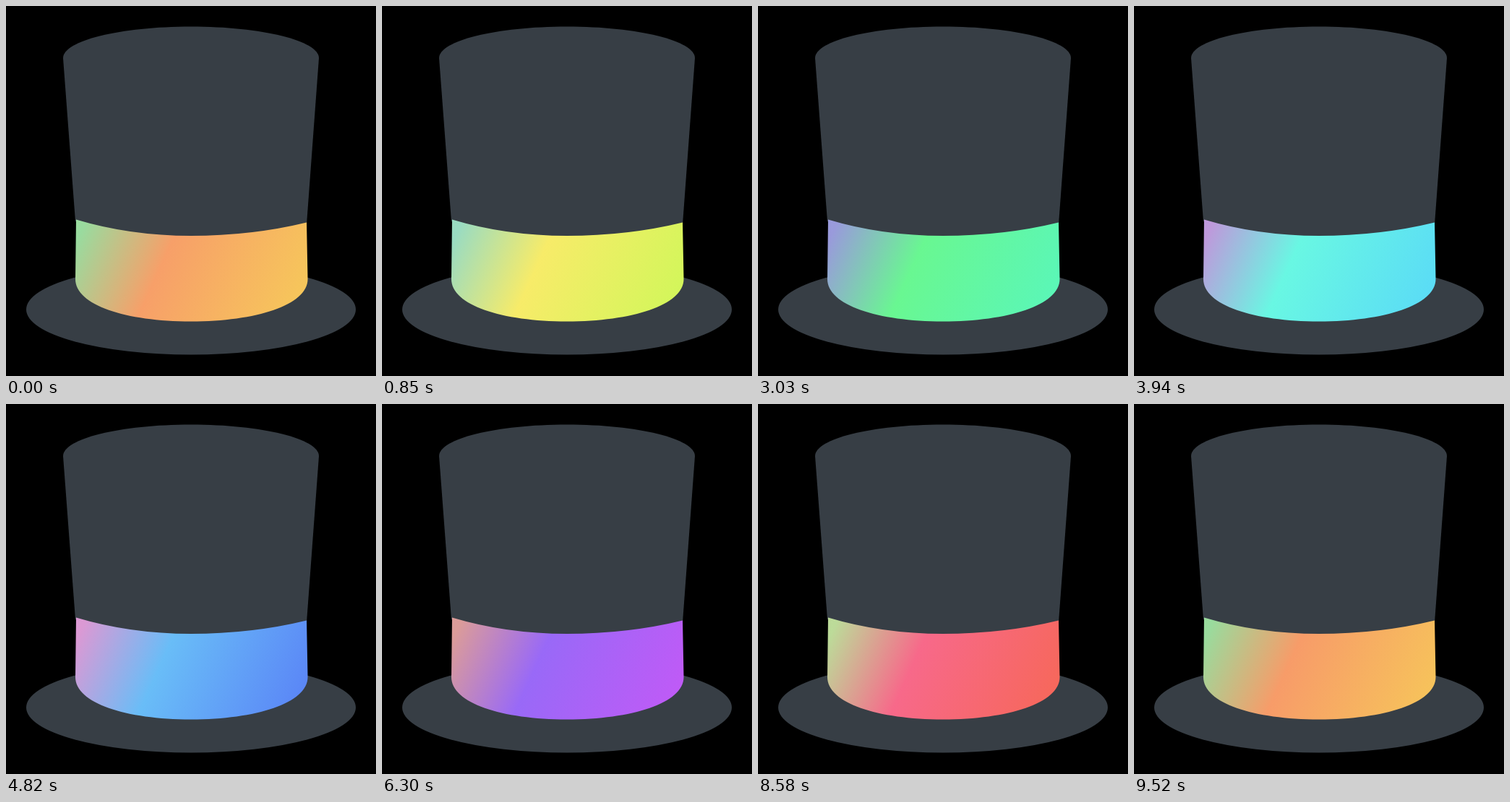
Animation, 512 px wide and 512 px high, one loop 9560 ms. Source, as an HTML page:

```html
<!DOCTYPE html>
<html>
<head>
<meta charset="utf-8">
<title>Top hat</title>
<style>
  html, body { margin: 0; width: 100%; height: 100%; overflow: hidden; background: #000; }
  svg { display: block; width: 100%; height: 100%; }
</style>
</head>
<body>
<svg viewBox="0 0 512 512">
  <defs>
    <linearGradient id="ribbon" gradientUnits="userSpaceOnUse" x1="96" y1="296" x2="402" y2="434">
      <stop offset="0.04"/>
      <stop offset="0.4"/>
      <stop offset="1"/>
    </linearGradient>
  </defs>
  <g fill="#373e45">
    <ellipse cx="256" cy="420" rx="228" ry="62.5"/>
    <path d="M79 72C79 48 158 28.500 256 28.500S433 48 433 72L416 302Q256 350 96 298Z"/>
  </g>
  <path fill="url(#ribbon)" d="M97 295.500Q172 318 256 318T416 299.500L417.500 378C417.500 414 346 436.500 256 436.500S96 414 96 378Z"/>
</svg>
<script>
  const LOOP = 9560;
  const stops = document.querySelectorAll('stop');
  // Hue, saturation and lightness of each stop at the start of the loop.
  const colors = [[125, 48, 73], [23, 90, 69], [42, 90, 66]];

  function draw(now) {
    const turn = (now % LOOP) / LOOP * 360;
    colors.forEach(([hue, sat, light], i) => {
      stops[i].setAttribute('stop-color', `hsl(${(hue + turn) % 360}, ${sat}%, ${light}%)`);
    });
  }

  const start = performance.now();
  function tick() {
    draw(performance.now() - start);
    requestAnimationFrame(tick);
  }
  tick();
</script>
</body>
</html>
```
